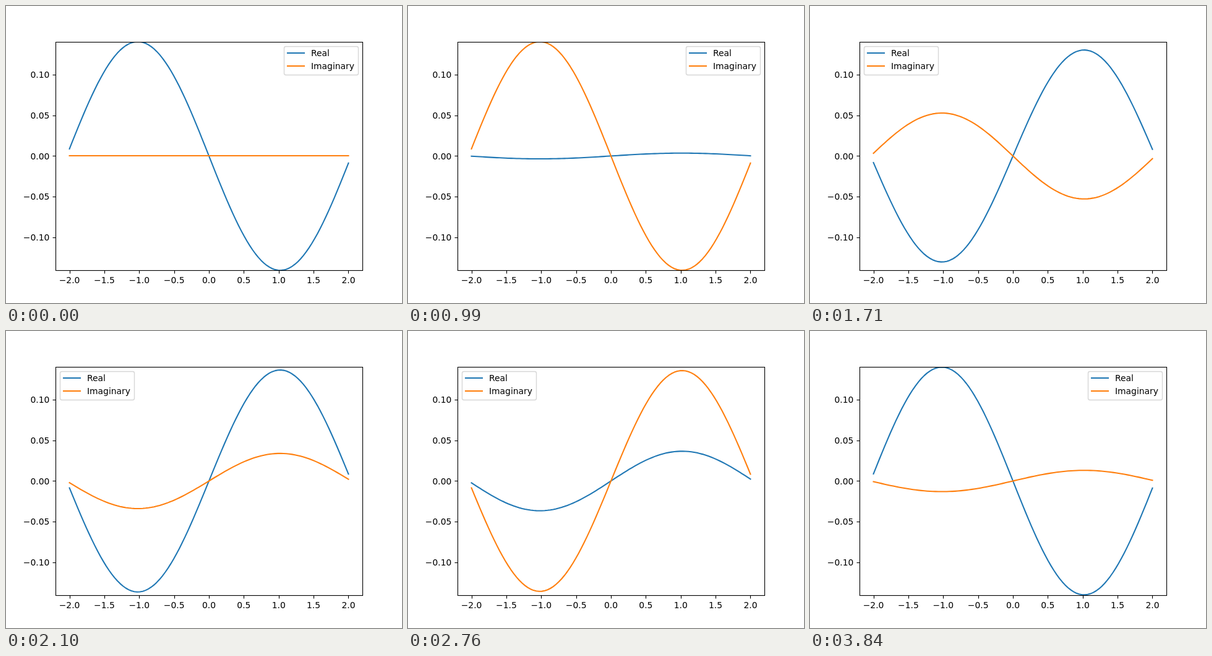
Recreate the animation shown at these times as an HTML page. Size 640x480 px, loop 3870 ms.

```html
<!DOCTYPE html>
<html lang="en">
<head>
<meta charset="utf-8">
<title>Wave function</title>
<style>
  html, body { margin: 0; width: 100%; height: 100%; overflow: hidden; background: #fff; }
  svg { display: block; width: 640px; height: 480px; }
  text { font: 13.889px "DejaVu Sans", sans-serif; fill: #000; }
  .axis { fill: none; stroke: #000; stroke-width: 1.11; }
  .line { fill: none; stroke-width: 2.083; stroke-linecap: square; stroke-linejoin: round; }
  .real { stroke: #1f77b4; }
  .imag { stroke: #ff7f0e; }
</style>
</head>
<body>
<svg viewBox="0 0 640 480">
  <clipPath id="area"><rect x="80" y="58" width="496" height="369"/></clipPath>
  <g id="ticks"></g>
  <g clip-path="url(#area)">
    <path id="real" class="line real"/>
    <path id="imag" class="line imag"/>
  </g>
  <rect class="axis" x="80.5" y="58.5" width="496" height="369"/>
  <g id="legend">
    <rect x="87.5" y="65.5" width="120" height="46" rx="2.78"
          fill="#fff" fill-opacity=".8" stroke="#ccc" stroke-opacity=".8" stroke-width="1.389"/>
    <path class="line real" d="M93 76H120"/>
    <path class="line imag" d="M93 97H120"/>
    <text x="131" y="81">Real</text>
    <text x="131" y="102">Imaginary</text>
  </g>
</svg>
<script>
const STEP = 30, STEPS = 129;
const PHASE_STEP = 0.04836;
const POINTS = 100;
const AMPLITUDE = Math.sqrt(2 / (POINTS + 1));
const WAVE_NUMBER = Math.PI / (2 + 4 / (POINTS - 1));
const LEGEND_LIMIT = 0.715; // relative height at which a curve reaches the legend

const $ = id => document.getElementById(id);
const toX = x => 328 + x * 496 / 4.4;
const toY = y => 242.4 - y * 184.8 / AMPLITUDE;
const label = (v, digits) => (v < 0 ? "\u2212" : "") + Math.abs(v).toFixed(digits);

function drawTicks() {
  let out = "";
  for (let i = -4; i <= 4; i++) {
    const x = toX(i / 2);
    out += `<path class="axis" d="M${Math.round(x) + 0.5} 427.5v5"/>` +
      `<text x="${x}" y="448" text-anchor="middle">${label(i / 2, 1)}</text>`;
  }
  for (let i = -2; i <= 2; i++) {
    const y = toY(i / 20);
    out += `<path class="axis" d="M80.5 ${Math.round(y) + 0.5}h-5"/>` +
      `<text x="70.3" y="${Math.round(y + 5.3)}" text-anchor="end">${label(i / 20, 2)}</text>`;
  }
  $("ticks").innerHTML = out;
}

function curve(scale) {
  if (scale === 0) return `M${toX(-2)} 242H${toX(2)}`;
  const points = [];
  for (let i = 0; i < POINTS; i++) {
    const x = -2 + 4 * i / (POINTS - 1);
    const y = -scale * AMPLITUDE * Math.sin(WAVE_NUMBER * x);
    points.push(toX(x).toFixed(2) + " " + toY(y).toFixed(2));
  }
  return "M" + points.join("L");
}

function render(ms) {
  const phase = PHASE_STEP * (Math.floor(ms / STEP) % STEPS);
  const re = Math.cos(phase), im = Math.sin(phase);
  $("real").setAttribute("d", curve(re));
  $("imag").setAttribute("d", curve(im));
  const blocked = Math.max(-re, -im) > LEGEND_LIMIT;
  $("legend").setAttribute("transform", `translate(${blocked ? 0 : 362} 0)`);
}

drawTicks();
render(0);
let start;
function tick(now) {
  start ??= now;
  render(now - start);
  requestAnimationFrame(tick);
}
requestAnimationFrame(tick);
</script>
</body>
</html>
```
